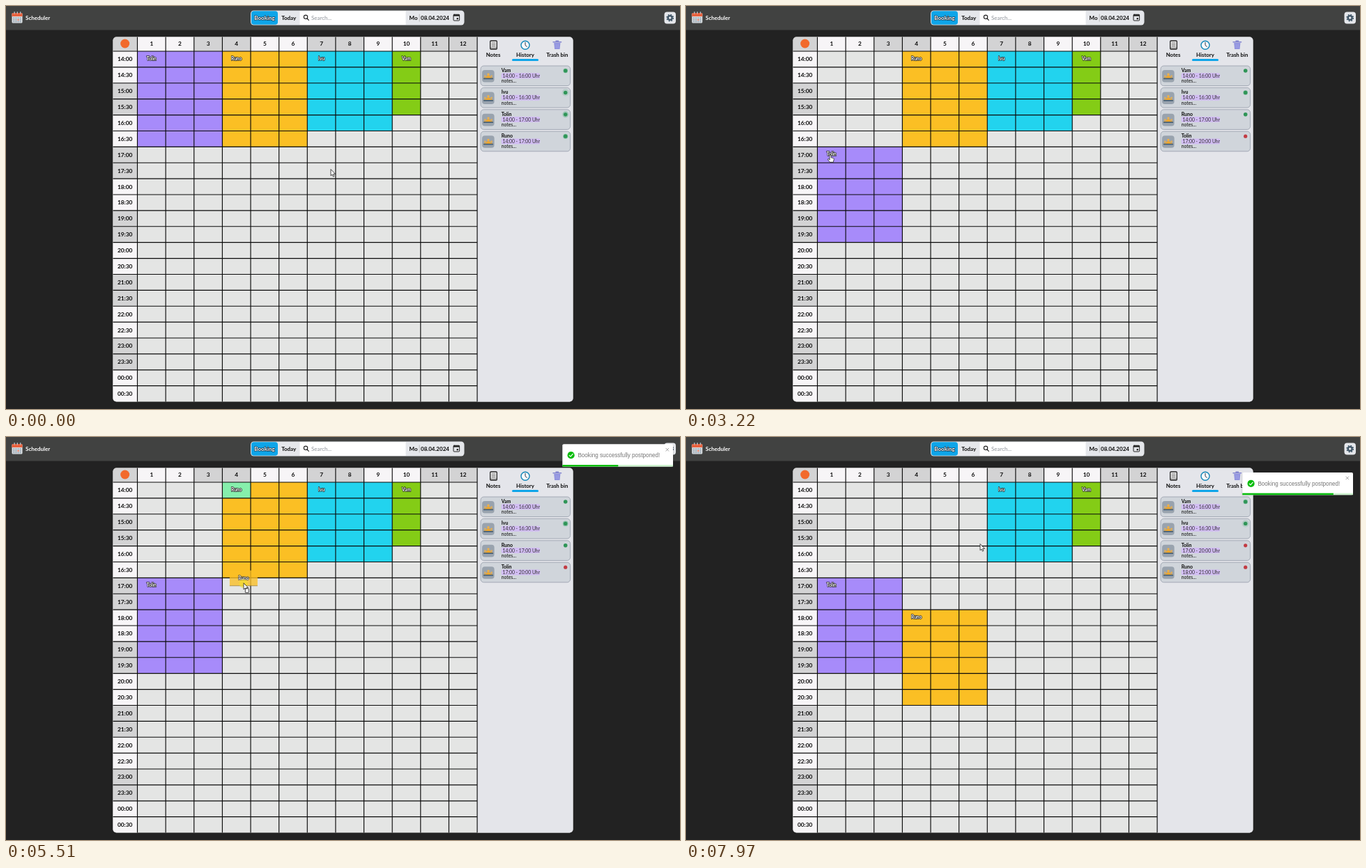
Recreate the animation shown at these times as an HTML page. Size 967 by 579 pixels, loop 7990 ms.

```html
<!DOCTYPE html>
<html lang="en">
<head>
<meta charset="utf-8">
<title>Scheduler</title>
<style>
  html, body { margin: 0; width: 100%; height: 100%; overflow: hidden; background: #222; }
  svg { display: block; width: 967px; height: 579px; font-family: Lato, sans-serif; }
  .bold { font-weight: 700; }
  .mid { text-anchor: middle; }
  .label { font-weight: 700; font-size: 6.6px; text-anchor: middle; fill: #fff; stroke: #222; stroke-width: 1.3px; paint-order: stroke; stroke-linejoin: round; }
  .toast { font-family: "Liberation Sans", Arial, sans-serif; }
</style>
</head>
<body>
<svg id="stage" viewBox="0 0 967 579"></svg>
<script>
const LOOP = 7990;
const LEFT = 188.5, TOP = 65, COL = 40.63, ROW = 22.89;
const DROPS = [2950, 6590];
const DRAGS = [
  { who: 0, press: 1640, start: 1760, end: DROPS[0], grab: [203, 82.5] },
  { who: 1, press: 4930, start: 5060, end: DROPS[1], grab: [330.5, 83.5] }
];
const HAND_TIMES = [[1400, 1760], [DROPS[0], 3990], [4780, 5060], [DROPS[1], 7420]];

// time, x, y of the pointer tip
const POINTER = [
  [0, 466, 235], [250, 465, 235], [600, 445, 233], [810, 416, 230], [1000, 345, 190],
  [1200, 260, 125], [1350, 217, 94], [1480, 204, 85], [1640, 203, 83], [1760, 203, 83],
  [1950, 203, 105], [2200, 206, 165], [2370, 208, 203], [2430, 207, 212], [2550, 207, 213.5],
  [3940, 207, 213.5], [4060, 217, 206], [4300, 255, 165], [4550, 300, 110], [4800, 329, 84],
  [5060, 330.5, 83.5], [5200, 332, 105], [5350, 337, 160], [5510, 341, 210], [5700, 341, 250],
  [5850, 340, 258], [7340, 340, 258.5], [7500, 358, 236], [7700, 392, 195], [7900, 419, 158],
  [7970, 422, 154]
];

const bookings = [
  { name: 'Tolin', col: 0, cols: 3, rows: 6, color: '#a78bfa', from: '14:00 - 17:00', to: '17:00 - 20:00', toRow: 6, drop: DROPS[0], slots: [2, 3, 2] },
  { name: 'Runo', col: 3, cols: 3, rows: 6, color: '#fbbf24', from: '14:00 - 17:00', to: '18:00 - 21:00', toRow: 8, drop: DROPS[1], slots: [3, 2, 3] },
  { name: 'Ivu', col: 6, cols: 3, rows: 5, color: '#22d3ee', from: '14:00 - 16:30', drop: Infinity, slots: [1, 1, 1] },
  { name: 'Vam', col: 9, cols: 1, rows: 4, color: '#84cc16', from: '14:00 - 16:00', drop: Infinity, slots: [0, 0, 0] }
];
const PULSE_PHASE = [800, 400, 1070, 300];

const stage = document.getElementById('stage');

function add(parent, tag, attrs = {}, text) {
  const node = document.createElementNS('http://www.w3.org/2000/svg', tag);
  set(node, attrs);
  if (text !== undefined) node.textContent = text;
  parent.appendChild(node);
  return node;
}
function set(node, attrs) {
  for (const key in attrs) node.setAttribute(key, attrs[key]);
}
const rect = (p, x, y, width, height, fill, more) => add(p, 'rect', { x, y, width, height, fill, ...more });
const circle = (p, cx, cy, r, fill, more) => add(p, 'circle', { cx, cy, r, fill, ...more });
const path = (p, d, fill, more) => add(p, 'path', { d, fill, ...more });
const text = (p, x, y, size, str, cls = '', fill = '#0b0b0b') =>
  add(p, 'text', { x, y: y + size * 0.36, 'font-size': size, class: cls, fill }, str);
const group = (p, attrs) => add(p, 'g', attrs);
const show = (node, on) => set(node, { visibility: on ? 'visible' : 'hidden' });
const move = (node, x, y) => set(node, { transform: `translate(${x.toFixed(2)} ${y.toFixed(2)})` });
const line = (color, width) => ({ stroke: color, 'stroke-width': width, 'stroke-linecap': 'round', 'stroke-linejoin': 'round' });

function drawHeader() {
  rect(stage, 0, 0, 967, 34.5, '#414241');
  rect(stage, 8.5, 10, 15, 14.5, '#dde2e6', { rx: 1.5 });
  path(stage, 'M8.5 15V11.5Q8.5 10 10 10H22Q23.5 10 23.5 11.5V15Z', '#e8603c');
  for (const x of [11.5, 15.7, 20]) rect(stage, x, 8, 1.3, 3.6, '#b9c2c9', { rx: .6 });
  for (let i = 0; i < 12; i++)
    rect(stage, 10.3 + i % 4 * 3.1, 16.4 + Math.floor(i / 4) * 2.6, 2, 1.7, i === 6 ? '#e8603c' : '#8d9aa5');
  text(stage, 28, 17, 8, 'Scheduler', 'bold', '#fff');

  rect(stage, 351, 6.5, 306.5, 21, '#e5e7eb', { rx: 4.5 });
  rect(stage, 352, 7.3, 38, 19.4, '#0ea5e9', { rx: 3.8 });
  add(stage, 'text', { x: 371, y: 19.6, 'font-size': 8, class: 'bold mid', fill: '#fff', stroke: '#123', 'stroke-width': 1.2, 'paint-order': 'stroke' }, 'Booking');
  text(stage, 405.7, 16.8, 8, 'Today', 'bold mid');
  rect(stage, 421.5, 7, 152, 20, '#fff');
  circle(stage, 430, 15.8, 2.7, 'none', line('#222', 1.1));
  path(stage, 'M432 18L434.3 20.4', 'none', line('#222', 1.2));
  text(stage, 438, 16.8, 8, 'Search...', '', '#8f949b');
  text(stage, 578.5, 16.8, 8, 'Mo', 'bold');
  rect(stage, 592.7, 11.5, .8, 11, '#aaa');
  text(stage, 595, 16.8, 8, '08.04.2024', 'bold');
  rect(stage, 642, 12.2, 8.6, 8.8, 'none', { rx: 1, ...line('#222', 1) });
  rect(stage, 642, 12.2, 8.6, 2.4, '#222');
  rect(stage, 646.6, 17, 2.3, 2.3, '#222');

  rect(stage, 944.5, 8.5, 16.5, 17, '#e5e7eb', { rx: 4 });
  circle(stage, 952.7, 17, 4.6, 'none', { stroke: '#3f5566', 'stroke-width': 1.6, 'stroke-dasharray': '1.9 1.71' });
  circle(stage, 952.7, 17, 2.9, 'none', { stroke: '#3f5566', 'stroke-width': 2.2 });
}

function drawBoard() {
  const clip = add(add(stage, 'defs'), 'clipPath', { id: 'round' });
  rect(clip, 153.5, 44.5, 660, 524, '#000', { rx: 5 });
  const board = group(stage, { 'clip-path': 'url(#round)' });
  rect(board, 153, 44, 661, 525, '#e4e5e4');
  rect(board, 676, 44, 138, 525, '#e4e5ea');
  const shade = i => Math.floor(i / 2) % 2 ? '#d3d3d4' : '#f7f5f7';
  rect(board, 153, 44, 36, 21, '#d3d3d4');
  for (let c = 0; c < 12; c++) rect(board, LEFT + c * COL, 44, COL, 21, shade(c));
  for (let r = 0; r < 22; r++) rect(board, 153, TOP + r * ROW, 35.5, ROW, shade(r));

  for (const b of bookings) {
    b.block = group(board);
    rect(b.block, LEFT + b.col * COL, TOP, b.cols * COL, b.rows * ROW, b.color);
    b.source = rect(b.block, LEFT + b.col * COL, TOP, COL, ROW, '#86efac');
  }
  let grid = '';
  for (let c = 0; c <= 12; c++) grid += `M${LEFT + c * COL} 44V569`;
  for (let r = 0; r < 22; r++) grid += `M153 ${TOP + r * ROW}H676`;
  path(board, grid, 'none', { stroke: '#0a0a0a', 'stroke-width': 1.15 });

  circle(board, 170.7, 54, 6.5, '#f26a2c');
  for (let c = 0; c < 12; c++) text(board, LEFT + (c + .5) * COL, 54.4, 8.3, c + 1, 'bold mid');
  for (let r = 0; r < 22; r++) {
    const hour = String((14 + Math.floor(r / 2)) % 24).padStart(2, '0');
    text(board, 170.7, TOP + (r + .5) * ROW, 8.4, hour + (r % 2 ? ':30' : ':00'), 'bold mid');
  }
  for (const b of bookings)
    b.label = add(board, 'text', { x: LEFT + (b.col + .5) * COL, y: 78, class: 'label' }, b.name);
}

function drawTabs() {
  rect(stage, 694.7, 50, 9.6, 12, '#f4f4f4', { rx: 1, ...line('#222', 1.3) });
  path(stage, 'M697 53H702M697 55.3H702M697 57.6H702M695 60H704', 'none', line('#444', .8));
  circle(stage, 745, 56.2, 6, '#f8fafc', line('#1387b8', 1.4));
  path(stage, 'M745 52.3V56.4L747.3 58.3', 'none', line('#334', 1));
  path(stage, 'M786.2 53H795.4L794.5 62H787.1Z', '#9193df');
  path(stage, 'M785 51.8H796.6M789 50.3H792.6', 'none', line('#8184cf', 1.4));
  path(stage, 'M789 55V60M790.8 55V60M792.6 55V60', 'none', line('#a9abe8', .6));
  ['Notes', 'History', 'Trash bin'].forEach((s, i) => text(stage, 699 + i * 45.9, 70.2, 7.8, s, 'bold mid'));
  rect(stage, 726, 76, 38, 3, '#0ea5e9', { rx: 1.5 });
}

function drawCard(b) {
  const g = b.card = group(stage);
  rect(g, 681, 86, 128.6, 28.6, '#d0d5db', { rx: 4.5, stroke: '#9ca3af', 'stroke-width': .9 });
  rect(g, 683, 92, 17.6, 17.6, '#99a3ae', { rx: 4 });
  path(g, 'M684.8 104.5Q687 100 689.3 104.5ZM694.5 104.5Q696.6 100 699 104.5Z', '#e5a336');
  path(g, 'M688 104.5Q688 100 692 100T696 104.5Z', '#f0a72d');
  circle(g, 692, 98.3, 1.7, '#eeb04a');
  circle(g, 687.4, 100.6, 1.2, '#eeb04a');
  circle(g, 696.6, 100.6, 1.2, '#eeb04a');
  rect(g, 685, 103.5, 14, 1.8, '#44607a', { rx: .6 });
  text(g, 710.7, 92.4, 7, b.name, 'bold');
  rect(g, 710.7, 96.3, 55.5, 8, '#d2bdf3', { rx: 2.5 });
  b.time = text(g, 712.5, 100.4, 6.75, '', '', '#333');
  text(g, 710.7, 107.8, 6.8, 'notes...');
  b.halo = circle(g, 802.7, 93, 3, '#22a05a');
  b.dot = circle(g, 802.7, 93, 2.7, '#2f9557');
}

function makeToast(y) {
  const g = group(stage, { class: 'toast' });
  const node = { g, y };
  rect(g, 797, 1, 161, 33, '#000', { rx: 3, opacity: .08 });
  rect(g, 798.3, 0, 158.7, 32.3, '#fff', { rx: 2 });
  rect(g, 798.3, 29.8, 158.7, 2.5, '#cdf2ce');
  node.bar = rect(g, 798.3, 29.8, 158.7, 2.5, '#07bc0c');
  circle(g, 810.6, 16, 5.1, '#07bc0c');
  path(g, 'M808.2 16.2L810 18L813.2 14.2', 'none', line('#fff', 1.2));
  text(g, 820.4, 16, 8.13, 'Booking successfully postponed!', '', '#757575');
  path(g, 'M946.8 6L950.8 10M950.8 6L946.8 10', 'none', line('#999', .9));
  return node;
}

function makePointer() {
  const g = group(stage);
  const edge = line('#222', .8);
  const press = circle(g, -.3, .3, 6.3, '#f2e02c', { opacity: .6 });
  const arrow = path(g, 'M0 0V8.8L2 7L3.4 10.2L4.9 9.5L3.5 6.4H6.2Z', '#fff', edge);
  const copy = rect(g, 2.3, 7.6, 5, 5.8, '#f4f4f4', { rx: .5, ...edge });
  const hand = path(g, 'M-1 1Q0 -.6 1 1V4.3L4.5 5Q5.5 5.3 5.2 7L4.4 10.8H-.6L-3.4 7.3Q-3.8 6 -2.4 6.1L-1 7.2Z', '#fff', edge);
  return { g, press, arrow, copy, hand };
}

function makeGhost(b) {
  const g = group(stage, { opacity: .78 });
  rect(g, 0, 0, 40, 22.4, b.color);
  rect(g, 0, 21.7, 40, .8, '#333', { opacity: .6 });
  add(g, 'text', { x: 20, y: 13.2, class: 'label' }, b.name);
  return g;
}

function follow(points, t, ease = p => p) {
  const i = points.findIndex(p => p[0] > t);
  if (i === 0) return points[0].slice(1);
  if (i < 0) return points[points.length - 1].slice(1);
  const a = points[i - 1], b = points[i], p = ease((t - a[0]) / (b[0] - a[0]));
  return a.slice(1).map((v, k) => v + (b[k + 1] - v) * p);
}
const easeOut = p => 1 - (1 - p) ** 3;
const smooth = p => p * p * (3 - 2 * p);
const BOUNCE_IN = [[0, 1510], [.6, -12.5], [.75, 5], [.9, -2.5], [1, 0]];
const BOUNCE_OUT = [[0, 0], [.2, -10], [1, 1007]];

function updateToast(toast, t, start, exit) {
  const inX = follow(BOUNCE_IN, (t - start) / 700, easeOut)[0];
  const out = (t - exit) / 700;
  const x = out > 0 ? follow(BOUNCE_OUT, out, smooth)[0] : inX;
  const [left] = follow([[0, 1], [3600, 0]], t - start - 700);
  show(toast.g, t >= start && out < 1);
  move(toast.g, x, toast.y);
  set(toast.bar, { width: 158.7 * left });
}

function updateBooking(b, i, t) {
  const moved = t >= b.drop;
  const drag = DRAGS.find(d => d.who === i && t >= d.start && t < d.end);
  const dy = moved ? b.toRow * ROW : 0;
  move(b.block, 0, dy);
  move(b.label, 0, dy);
  show(b.source, Boolean(drag));
  const slot = b.slots[DROPS.filter(d => t >= d).length];
  move(b.card, 0, slot * 31.4);
  b.time.textContent = (moved ? b.to : b.from) + ' Uhr';

  const phase = (t + PULSE_PHASE[i]) % 2000 / 2000;
  const grow = Math.min(1, phase / .7);
  show(b.halo, !moved);
  set(b.halo, { r: 2.6 + 3.2 * grow, opacity: .7 * (1 - grow) });
  set(b.dot, { r: moved ? 2.6 : 2.5 + .3 * grow, fill: moved ? '#c23b43' : '#2f9557' });
}

drawHeader();
drawBoard();
drawTabs();
bookings.forEach(drawCard);
const toasts = [makeToast(10.2), makeToast(50.9)];
const ghosts = DRAGS.map(d => makeGhost(bookings[d.who]));
const pointer = makePointer();

function render(t) {
  const [x, y] = follow(POINTER, t);
  bookings.forEach((b, i) => updateBooking(b, i, t));
  updateToast(toasts[0], t, 3025, 7370);
  updateToast(toasts[1], t, 6632, Infinity);
  let pressed = false, dragging = false;
  DRAGS.forEach((d, i) => {
    const active = t >= d.start && t < d.end;
    pressed ||= t >= d.press && t < d.end;
    dragging ||= active;
    show(ghosts[i], active);
    move(ghosts[i], LEFT + bookings[d.who].col * COL + x - d.grab[0], TOP + y - d.grab[1]);
  });
  const hand = HAND_TIMES.some(([a, b]) => t >= a && t < b);
  move(pointer.g, x, y);
  show(pointer.press, pressed);
  show(pointer.copy, dragging);
  show(pointer.hand, hand);
  show(pointer.arrow, !hand);
}

const began = performance.now();
function tick() {
  render((performance.now() - began) % LOOP);
  requestAnimationFrame(tick);
}
tick();
</script>
</body>
</html>
```
